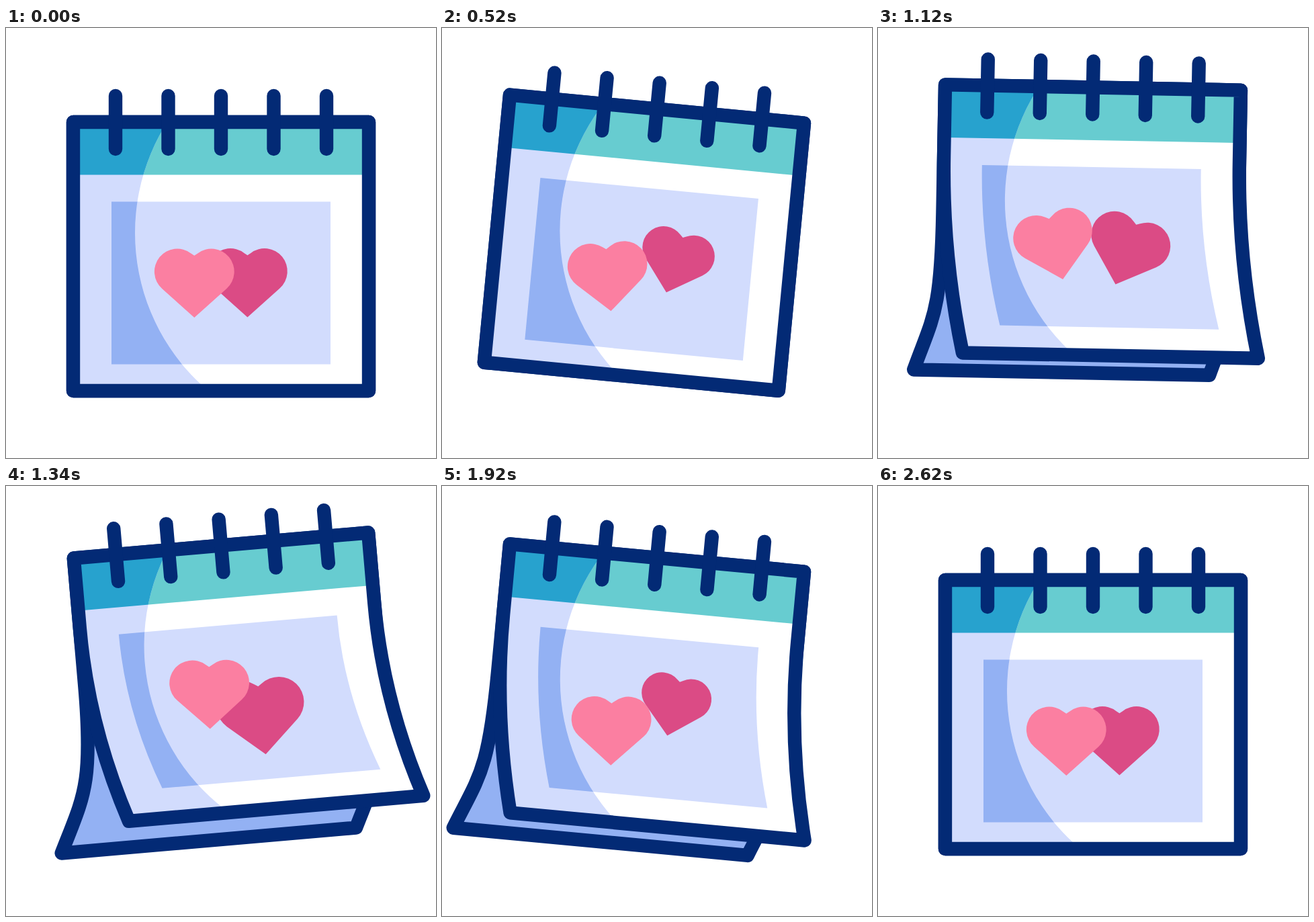
An HTML page that plays this animation: 640x640 px, repeating every 3000 ms.

```html
<!DOCTYPE html>
<html lang="en">
<head>
<meta charset="utf-8">
<title>Calendar with hearts</title>
<style>
  html, body { margin: 0; width: 100%; height: 100%; overflow: hidden; background: #fff; }
  svg { display: block; width: 100vw; height: 100vh; }
  .line { fill: none; stroke: #032a75; stroke-width: 20.4; stroke-linecap: round; stroke-linejoin: round; }
</style>
</head>
<body>
<svg viewBox="0 0 640 640">
  <defs>
    <clipPath id="shade"><path d="M0 -3H500A308 308 0 0 0 500 613H0Z"/></clipPath>
    <path id="heart" d="M0 46.5L-48 3.5A34 34 0 0 1 -5 -49.1L0 -45.8L5 -49.1A34 34 0 0 1 48 3.5Z"/>
  </defs>
  <g id="calendar">
    <path class="line back" style="fill:#93b1f3"/>
    <path class="sheet" fill="#fff"/>
    <path d="M105 145H535V218.5H105Z" fill="#67ccd0"/>
    <path class="panel" fill="#d2dcfd"/>
    <g clip-path="url(#shade)">
      <path class="sheet" fill="#d2dcfd"/>
      <path d="M105 145H535V218.5H105Z" fill="#27a2ce"/>
      <path class="panel" fill="#93b1f3"/>
    </g>
    <use id="dark" href="#heart" fill="#db4b85"/>
    <use id="pink" href="#heart" fill="#fb7fa1"/>
    <path class="line sheet"/>
    <path class="line rings"/>
  </g>
</svg>
<script>
const LOOP = 3000;

const $ = selector => document.querySelector(selector);
const setPath = (selector, d) =>
  document.querySelectorAll(selector).forEach(el => el.setAttribute('d', d));

// Smooth step from 0 to 1 between two times.
function ease(time, start, end) {
  const u = Math.min(1, Math.max(0, (time - start) / (end - start)));
  return u * u * (3 - 2 * u);
}

// A sheet with vertical sides that curve sideways below `start`.
function curvedSheet(left, right, top, start, bottom, bend) {
  const mid = (start + bottom) / 2;
  return `M${left} ${top}H${right}V${start}Q${right} ${mid} ${right + bend} ${bottom}` +
    `H${left + bend}Q${left} ${mid} ${left} ${start}Z`;
}

function backSheet(spread) {
  const end = 540 + .64 * spread, hook = .3 * spread;
  return `M100 140H540V330C540 480 ${540 - hook} ${end - 80} ${540 - spread} ${end}` +
    `H${100 - spread}C${100 - hook} ${end - 80} 100 480 100 330Z`;
}

function placeHeart(id, x, y, dx, dy, scale) {
  $(id).setAttribute('transform',
    `translate(${x + dx} ${y + dy}) rotate(${dx * 1.27}) scale(${scale})`);
}

function render(time) {
  const step = (start, end) => ease(time, start, end);
  const lean = step(195, 533);

  const tilt = 5.5 * (lean - step(2000, 2633)) - 11.2 * (step(892, 1425) - step(1425, 1955));
  const lift = -19.5 * lean - 39.5 * step(533, 820) + 7.5 * step(895, 1110) + 51.5 * step(1590, 2408);
  const open = .68 * step(533, 814) + .32 * step(1090, 1330) - step(1750, 2333);
  const bend = 48 * open;

  // The hearts circle each other; the dark one shrinks as it moves away.
  const x = -12.5 * (step(195, 720) - 2 * step(1080, 1520) + 1.4 * step(1520, 1990) - .4 * step(2150, 2630));
  const y = 23 * (step(195, 720) - 2 * step(720, 1450) + 2 * step(1450, 1930) - step(2000, 2625));

  $('#calendar').setAttribute('transform', `translate(0 ${lift}) rotate(${tilt} 320 140)`);
  setPath('.back', backSheet(56 * open));
  setPath('.sheet', curvedSheet(100, 540, 140, 245, 540 - .0013 * bend * bend, bend));
  setPath('.panel', curvedSheet(157, 483, 258.5, 258.5, 500.5 - .0035 * bend * bend, .93 * bend));
  placeHeart('#pink', 280.3, 384.5, x * .92, y, 1);
  placeHeart('#dark', 359.4, 384, 2.5 * open - x * 1.05, -y, 1 - y * .005);
}

function tick() {
  render(performance.now() % LOOP);
  requestAnimationFrame(tick);
}

setPath('.rings', [-2, -1, 0, 1, 2].map(i => `M${320 + 78.5 * i} 101V180`).join(''));
tick();
</script>
</body>
</html>
```
